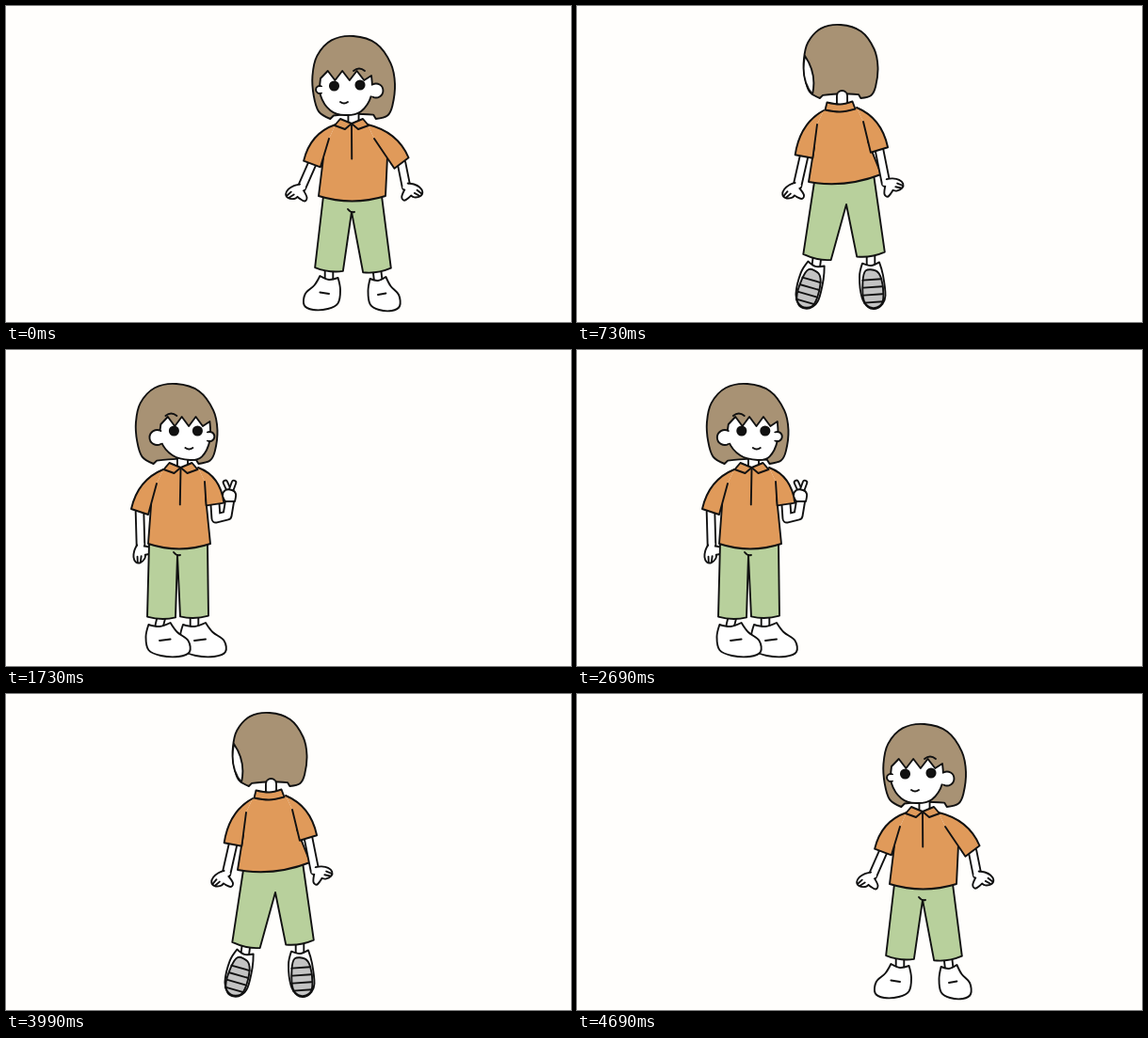
Write an HTML page that moves like this. It is 600 px wide and 336 px high and loops after 4.84 s.

```html
<!DOCTYPE html>
<html lang="en">
<head>
<meta charset="utf-8">
<title>Turning girl</title>
<style>
html, body { margin: 0; width: 100%; height: 100%; overflow: hidden; background: #fffefc; }
svg { display: block; width: 600px; height: 336px; }
path, circle { stroke: #111; stroke-width: 1.9; stroke-linejoin: round; stroke-linecap: round; fill: none; vector-effect: non-scaling-stroke; }
.hair { fill: #a89274; }
.shirt { fill: #e09a5a; }
.pants { fill: #b8d09c; }
.skin { fill: #fff; }
.sole { fill: #c3c3c3; }
.eye { fill: #111; }
.bare { stroke: none; }
</style>
</head>
<body>
<svg id="stage" viewBox="0 0 600 336"></svg>
<script>
// Shared shapes around their own origin; "!" marks a sharp corner.
const HAIR = "0,0 5.5,.9 9,3.3 10,5.8 9.4,8.4 8.2,9.6 5.4,10! 4.8,9.5! 0,9.4 -4.8,9.6! -5.6,10! -8.4,9.1 -9.6,7.2 -9.9,4.8 -8.8,2.4 -5.3,.5";
const HAND = "0,-4! 6,-6 13,-6 18,-3 18,2 13,6 9,6! 8,9 5,14 1,12 0,4!";
const TOE_SHOE = "-8,1! -10,14 -8,28 1,34 14,35 22,30 21,18 13,9 8,-1! 0,3";
const LONG_SHOE = "-9,0! -13,14 -12,36 -6,47 2,49 9,45 13,36 12,14 9,0! 0,3";
const SOLE = "-6,8 -10,20 -10,40 -2,48 8,45 11,35 10,18 5,9";

// A pose is a set of joints; left and right are as seen on the stage.
// arms: sleeve end to wrist, then hand angle and thumb side; shoes: x, y, angle, stretch.
const front = {
  view: "front", hair: [369, 32, 44, 88], neck: [[350, 126], [384, 126]], spread: 14,
  waist: [[332, 202], [403, 202]], hips: [337, 399], crotch: [367, 219], hems: [[343, 280], [394, 281]],
  arms: [{ line: [[325, 168], [314, 193]], hand: [148, -1] }, { line: [[420, 167], [425, 192]], hand: [28, 1] }],
  shoe: "toe", shoes: [[343, 288, 0, -1.2], [395, 289, 0, 1.05]],
  face: { box: [334, 388, 74, 116], chin: .48, ears: [[393, 90, 1, 7.5], [333, 89, -1, 4]],
    eyes: [[348.5, 85], [376, 84]], closed: 0, mouth: [359, 102], brow: [375, 67] }
};
const step = {
  view: "front", hair: [352, 25, 41, 89], neck: [[334, 119], [367, 118]], spread: 14,
  waist: [[312, 188], [383, 191]], hips: [314, 376], crotch: [342, 213], hems: [[331, 270], [374, 269]],
  arms: [{ line: [[315, 159], [304, 184]], hand: [138, -1] }, { line: [[390, 163], [397, 187]], hand: [50, 1] }],
  shoe: "long", shoes: [[328, 279, 4, -1], [374, 280, -32, 1]],
  face: { box: [318, 361, 68, 108], chin: .47, ears: [[367, 79, 1, 7.5], [322, 85, -1, 0]],
    eyes: [[323, 80], [343, 81]], closed: 1, mouth: [328, 94], brow: [344, 63] }
};
const back = {
  view: "back", hair: [280, 20, 39.5, 78], neck: [[262, 111], [297, 108]], spread: 14,
  waist: [[246, 187], [323, 179]], hips: [252, 315], crotch: [286, 211], hems: [[255, 267], [312, 264]],
  arms: [{ line: [[241, 160], [234, 191]], hand: [140, -1] }, { line: [[321, 153], [328, 188]], hand: [12, 1] }],
  shoe: "long", shoes: [[254, 274, 16, 1], [312, 273, -4, 1]]
};
const side = {
  view: "side", hair: [243, 20, 38, 78], neck: [[229, 108], [261, 106]], spread: -8,
  waist: [[198, 178], [259, 188]], hips: [197, 245], crotch: [211, 214], hems: [[170, 251], [226, 266]],
  arms: [{ line: [[204, 168], [195, 175]], hand: [135, -1] }, { line: [[264, 151], [275, 187]], hand: [42, 1] }],
  shoe: "long", shoes: [[160, 263, -26, 1], [227, 275, -11, 1]],
  face: { box: [263, 280, 63, 91], chin: .4, ears: [[256, 72, -1, 7.5]], eyes: [], brow: [274, 51] }
};
const wave = {
  view: "front", hair: [185, 34, 43, 88], neck: [[171, 124], [206, 122]], spread: 14,
  waist: [[153, 199], [219, 198]], hips: [153, 214], crotch: [183, 213], hems: [[165, 278], [200, 279]],
  arms: [{ line: [[147, 168], [144, 202]], hand: [100, -1] }, { line: [[228, 165], [224, 177], [240, 165]], hand: [-48, -1] }],
  shoe: "toe", shoes: [[164, 290, 0, 1.5], [200, 291, 0, 1.45]],
  face: { box: [174, 221, 74, 116], chin: .6, ears: [[169, 90, -1, 8]],
    eyes: [[189, 86], [212, 85.5]], closed: 0, mouth: [206, 102], brow: [188, 70] }
};
const stand = {
  view: "front", hair: [181, 36, 43.5, 85], neck: [[167, 127], [204, 125]], spread: 14,
  waist: [[151, 206], [217, 206]], hips: [152, 214], crotch: [182, 218], hems: [[165, 284], [200, 283]],
  arms: [{ line: [[142, 172], [143, 208]], hand: [97, -1] }, { line: [[222, 164], [223, 179], [235, 176], [238, 158]], peace: true }],
  shoe: "toe", shoes: [[163, 291, 0, 1.45], [200, 291, 0, 1.5]],
  face: { box: [164, 216, 76, 117], chin: .6, ears: [[160, 93, -1, 8], [216, 92, 1, 5]],
    eyes: [[178, 86], [203, 86]], closed: 0, mouth: [194, 104], brow: [175, 68] }
};

const move = ([x, y], dx, dy) => [x + dx, y + dy];
const mix = (a, b, t) => {
  if (typeof a === "number") return a + (b - a) * t;
  if (Array.isArray(a)) return a.map((v, i) => mix(v, b[i], t));
  if (typeof a !== "object") return t < .5 ? a : b;
  return Object.fromEntries(Object.keys(a).map(k => [k, mix(a[k], b[k], t)]));
};

// The two ends of a hem that lies square to the line from a to b.
function hemEnds(a, b, half) {
  const dx = b[0] - a[0], dy = b[1] - a[1], k = half / Math.hypot(dx, dy);
  return [move(b, -dy * k, dx * k), move(b, dy * k, -dx * k)];
}

const path = (cls, d, place = "") => `<path class="${cls}" d="${d}" transform="${place}"/>`;
const group = (body, place) => `<g transform="${place}">${body}</g>`;
const parse = text => text.split(" ").map(s => [...s.replace("!", "").split(",").map(Number), s.endsWith("!")]);

// Closed smooth curve through the points, straight into corners.
function blob(pts) {
  const n = pts.length, at = i => pts[(i + n) % n];
  const handle = (i, dir) => [0, 1].map(k =>
    at(i)[k] + (at(i)[2] ? 0 : (at(i + 1)[k] - at(i - 1)[k]) * dir / 6));
  return `M${at(0).slice(0, 2)}` + pts.map((p, i) =>
    `C${handle(i, 1)} ${handle(i + 1, -1)} ${at(i + 1).slice(0, 2)}`).join("") + "Z";
}
const shape = (cls, text, place) => path(cls, blob(parse(text)), place);

function limb(pts, width) {
  const d = "M" + pts.join("L");
  return `<path d="${d}" style="stroke-width:${width}"/>
    <path d="${d}" style="stroke:#fff;stroke-width:${width - 3.8}"/>`;
}

function arm({ line, hand, peace }) {
  const wrist = line[line.length - 1];
  if (peace) {
    const tips = [-5, 4].map(dx => limb([move(wrist, 0, -6), move(wrist, dx, -17)], 6.5)).join("");
    return limb(line, 11) + tips + shape("skin", "-5,3! -8,-3 -5,-9 2,-9 6,-5 5,3!", `translate(${wrist})`);
  }
  const fingers = path("", "M12,-2L18,-1M11,2L17,2");
  return limb(line, 10.5) + group(shape("skin", HAND) + path("skin bare", "M-3,-3H5V3H-3Z") + fingers,
    `translate(${wrist}) rotate(${hand[0]}) scale(1 ${hand[1]})`);
}

function shoe(pose, [x, y, angle, stretch]) {
  let body;
  if (pose.shoe === "toe") body = shape("skin", TOE_SHOE) + path("", "M0,18L8,16.5");
  else {
    body = shape("skin", LONG_SHOE);
    if (pose.view === "back") {
      body += shape("sole", SOLE);
      for (let i = 0; i < 4; i++) body += path("", `M-10,${18 + i * 8}h20`);
    } else if (pose.view === "side") body += path("", "M-9,2Q-10,30 -3,47M3,31L11,27");
    else body += path("", "M-3,35L6,33");
  }
  return group(body, `translate(${x} ${y}) rotate(${angle}) scale(${stretch} 1)`);
}

function pants({ hips, waist, crotch, hems }) {
  const top = hips.map((x, i) => [x, waist[i][1]]);
  const legs = hems.map((hem, i) => {
    const [a, b] = hemEnds(mix(top[i], crotch, .5), hem, 15);
    return `${a}Q${move(hem, 0, 4)} ${b}`;
  });
  return path("pants", `M${top[0]}L${legs[0]}L${crotch}L${legs[1]}L${top[1]}`);
}

// Sleeve outline, and the point where the shirt's side comes out below it.
function sleeve(neck, hem, dir, spread) {
  const top = move(neck, dir * spread, 12), ends = hemEnds(top, hem, 9.5);
  const [outer, inner] = dir < 0 ? ends : ends.reverse();
  const pit = move(top, -dir * 7, 3), bulge = move(mix(neck, outer, .5), dir * 10, -10);
  return { d: `M${pit}L${inner}L${outer}Q${bulge} ${neck}`, pit, out: mix(pit, inner, .65) };
}

function shirt(pose) {
  const { neck, waist, arms, spread, view } = pose;
  const sleeves = arms.map((a, i) => sleeve(neck[i], a.line[0], i * 2 - 1, spread));
  const [l, r] = sleeves, mid = mix(neck[0], neck[1], .5), low = mix(waist[0], waist[1], .5);
  const hem = `${waist[0]}Q${move(low, 0, 11)} ${waist[1]}`;
  let body;
  if (view === "side") {
    sleeves.shift();
    const bend = move(mix(neck[0], waist[0], .5), -4, -5);
    body = path("shirt bare", `M${neck[0]}Q${bend} ${hem}L${r.out}L${neck[1]}Z`)
      + path("", `M${neck[0]}Q${bend} ${hem}L${r.out}`);
  } else {
    body = path("shirt bare", `M${neck[0]}L${l.pit}L${l.out}L${hem}L${r.out}L${r.pit}L${neck[1]}Z`)
      + path("", `M${l.out}L${hem}L${r.out}`);
  }
  body += arm(arms[1]) + sleeves.map(s => path("shirt", s.d)).join("");
  if (view === "front") {
    const wing = shape("shirt", "-12,-6! -18,1! -7,5! 0,-1!");
    body += path("", `M${mid}L${mix(mid, low, .48)}`)
      + group(wing + group(wing, "scale(-1 1)"), `translate(${mid})`);
  } else body += shape("shirt", "-14,-7! -16,1! 0,3 16,0! 13,-8! 0,-5", `translate(${mid})`);
  return body;
}

function ear([x, y, dir, r]) {
  if (r < 1) return "";
  const dx = -dir * r * .5, dy = r * .87;
  return path("skin", `M${x + dx},${y - dy}A${r},${r} 0 1 ${dir > 0 ? 1 : 0} ${x + dx},${y + dy}`)
    + `<circle class="skin bare" cx="${x - dir * r * .55}" cy="${y}" r="${r * .75}"/>`;
}

function face({ box: [x0, x1, y0, y1], chin, ears, eyes, closed, mouth, brow }) {
  const w = x1 - x0, h = y1 - y0, lean = (chin - .5) * w * .4;
  const teeth = Math.round(w / 8);
  const pts = [[x1, y0, true], [x1, y0 + h * .5], [x1 - w * .2 + lean, y0 + h * .91], [x0 + w * chin, y1],
    [x0 + w * .2 + lean, y0 + h * .88], [x0, y0 + h * .5], [x0, y0 + 3, true]];
  for (let i = 1; i < teeth; i++) pts.push([x0 + w * i / teeth, y0 + (i % 2 ? -5 : 5), true]);
  let body = path("skin", blob(pts)) + ears.map(ear).join("");
  body += eyes.map(([x, y]) => closed > .5
    ? path("", `M${x - 5},${y - .5}q6,2 12,0`)
    : `<circle class="eye" cx="${x}" cy="${y}" r="4.6"/>`).join("");
  if (mouth) body += path("", `M${move(mouth, -4, 0)}q4,${3 - 3 * closed} 8,0`);
  return body + path("", `M${move(brow, -6, 2)}q6,-5 12,0`);
}

function draw(pose, turn = 0) {
  const { hair: [x, top, rx, h], neck, hems, shoes, view } = pose;
  const throat = move(mix(neck[0], neck[1], .5), 2, -3);
  const feet = [1, 0].map(i => limb([hems[i], move(shoes[i], 0, 1).slice(0, 2)], 10.5) + shoe(pose, shoes[i]));
  return shape("hair", HAIR, `translate(${x} ${top}) scale(${rx / 10} ${h / 10})`)
    + limb([move(throat, 0, -11), throat], 13)
    + arm(pose.arms[0]) + feet.join("") + pants(pose)
    + (view === "front" ? path("", `M${move(pose.crotch, -4, -3)}q3,4 7,3`) : "")
    + (view === "side" ? path("", `M${pose.crotch}q4,-14 15,-15`) : "")
    + shirt(pose)
    + (view === "back" ? path("skin", "M-38,33Q-43,58 -30,74Q-25,52 -38,33Z", `translate(${x} ${top})`)
      : group(face(pose.face), `translate(${turn} 0)`));
}

const mirror = (pose, sum) => group(draw(pose), `translate(${sum} 0) scale(-1 1)`);

// Start time and picture; the second half of the loop runs them backwards.
const poses = [
  [0, draw(front)],
  [180, draw(mix(front, step, .33))],
  [300, draw(mix(front, step, .7))],
  [420, draw(step)],
  [610, mirror(side, 553)],
  [730, draw(back)],
  [880, group(draw(back), "translate(-18 0)")],
  [1000, draw(side)],
  [1180, mirror(step, 567)],
  [1300, draw(wave)],
  ...[1420, 1610, 1730, 1880, 2000, 2180, 2300, 2420].map((t, i) => [t, draw(stand, 4 - i * 1.8)])
];
const LOOP = 4840, TURN = 2435;

const stage = document.getElementById("stage");
stage.innerHTML = poses.map(p => `<g display="none">${p[1]}</g>`).join("");
const layers = [...stage.children];
const begin = performance.now();
let shown = -1;

function poseAt(t) {
  const reached = t < TURN ? p => p[0] <= t : p => p[0] < 2 * TURN - t;
  return poses.filter(reached).length - 1;
}

function tick() {
  const next = poseAt((performance.now() - begin) % LOOP);
  if (next !== shown) {
    layers.forEach((g, i) => g.setAttribute("display", i === next ? "inline" : "none"));
    shown = next;
  }
  requestAnimationFrame(tick);
}
tick();
</script>
</body>
</html>
```
